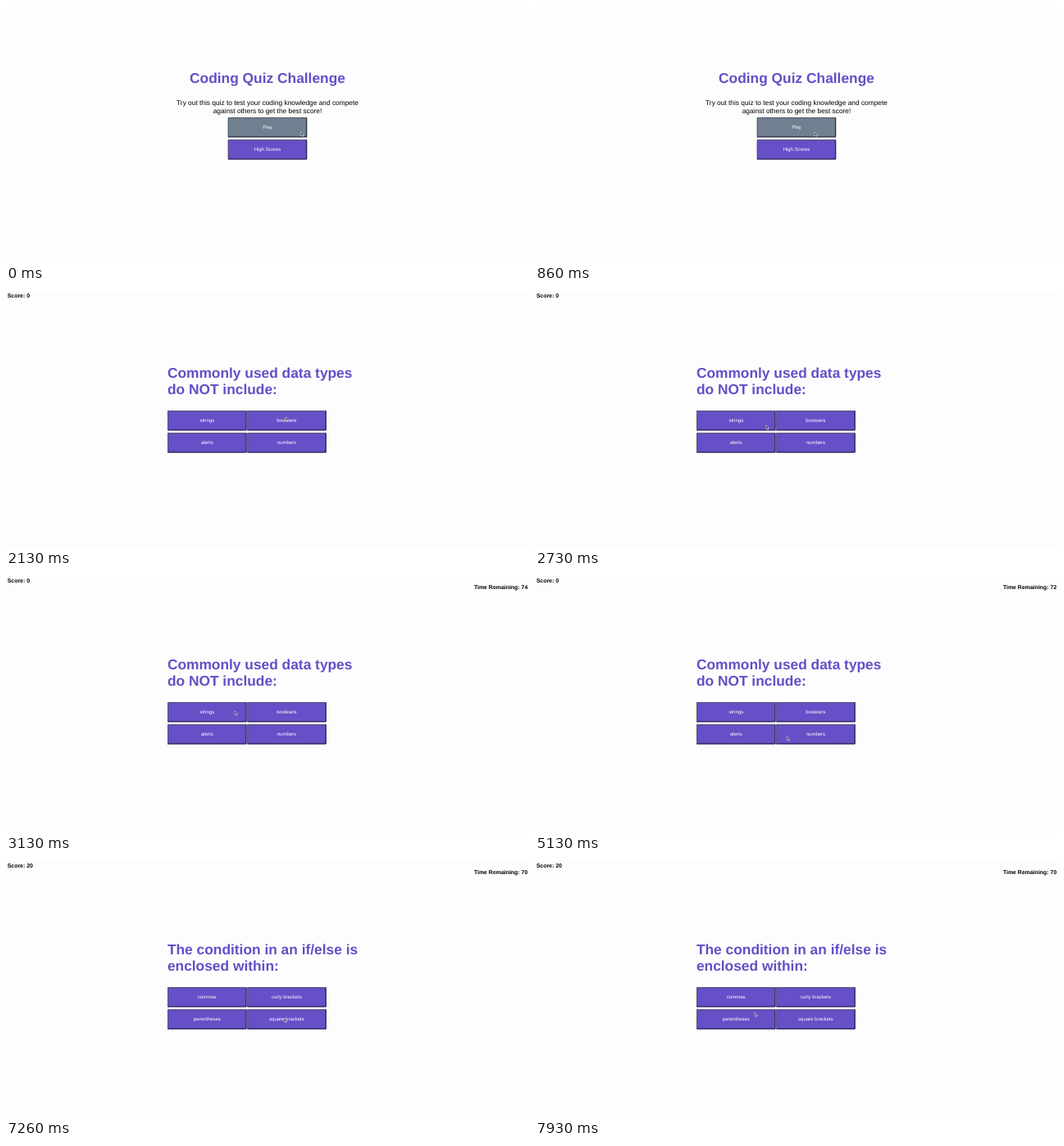
Animation, 638 px wide and 314 px high, one loop 8 s. Source, as an HTML page:

```html
<!DOCTYPE html>
<html lang="en">
<head>
<meta charset="utf-8">
<title>Coding Quiz Challenge</title>
<style>
  html, body { margin: 0; width: 100%; height: 100%; overflow: hidden; background: #fdfdfd; }
  svg { display: block; overflow: hidden; }
  text { font-family: "Liberation Sans", Arial, sans-serif; text-rendering: geometricPrecision; }
  .heading { font-size: 17.35px; font-weight: bold; fill: #654ec6; }
  .intro { font-size: 8.35px; text-anchor: middle; }
  .status { font-size: 6.95px; font-weight: bold; }
  .label text { font-size: 6px; fill: #fff; text-anchor: middle; }
  .button { color: #664fc7; }
  .hovered { color: #708090; }

  .scenes, .timer, .settle, .cursor { animation: 8s step-end infinite; }
  .scenes { animation-name: scenes; }
  .timer { animation-name: timer; }
  .settle { animation-name: settle; }
  .cursor { animation-name: cursor; }

  /* Screens are stacked one stage height apart. */
  @keyframes scenes {
    0% { transform: translateY(0); }
    26.625% { transform: translateY(-314px); }
    74.125% { transform: translateY(-628px); }
    90.75%, 100% { transform: translateY(-942px); }
  }
  @keyframes timer {
    0% { transform: translateY(20px); }
    39.125% { transform: translateY(0); }
    51.625% { transform: translateY(-20px); }
    64.125% { transform: translateY(-40px); }
    76.625% { transform: translateY(-60px); }
    89.125%, 100% { transform: translateY(-80px); }
  }
  /* The page drops once the timer takes up a line. */
  @keyframes settle {
    0% { transform: translateY(-8px); }
    39.125%, 100% { transform: translateY(0); }
  }
  @keyframes cursor {
    0% { transform: translate(360px, 153.8px); }
    3.25% { transform: translate(352px, 154px); }
    10.75% { transform: translate(341.2px, 154px); }
    34.125% { transform: translate(282px, 164px); }
    39.125% { transform: translate(279.3px, 165px); }
    49.125% { transform: translate(288px, 186px); }
    51.625% { transform: translate(279.5px, 189px); }
    58.25% { transform: translate(293.5px, 196px); }
    64.125% { transform: translate(307.2px, 195.8px); }
    73.25% { transform: translate(268px, 194.8px); }
    85% { transform: translate(339.5px, 192px); }
    99.125%, 100% { transform: translate(268px, 184.8px); }
  }
</style>
</head>
<body>
<svg width="100%" height="100%" viewBox="0 0 638 314">
  <defs>
    <g id="button">
      <rect width="96.4" height="24.2" fill="currentColor"/>
      <path d="M.4 24V.5H96" fill="none" stroke="#555064" stroke-width=".9"/>
      <path d="M.4 23.7H95.9V.4" fill="none" stroke="#1c1733"/>
    </g>
    <g id="choices" class="button">
      <use href="#button" x="197.1" y="154.2"/>
      <use href="#button" x="294.3" y="154.2"/>
      <use href="#button" x="197.1" y="181.3"/>
      <use href="#button" x="294.3" y="181.3"/>
    </g>
  </defs>

  <g class="scenes">
    <g>
      <text class="heading" x="319" y="93.5" text-anchor="middle">Coding Quiz Challenge</text>
      <text class="intro" x="319" y="121.3">Try out this quiz to test your coding knowledge and compete</text>
      <text class="intro" x="319" y="130.9">against others to get the best score!</text>
      <use class="hovered" href="#button" x="270.8" y="136.2"/>
      <use class="button" href="#button" x="270.8" y="163.3"/>
      <g class="label">
        <text x="319" y="150.1">Play</text>
        <text x="319" y="177.2">High Scores</text>
      </g>
    </g>

    <g transform="translate(0 314)">
      <text class="status" x="1.7" y="8">Score: 0</text>
      <g class="settle">
        <text class="heading" x="196.9" y="114.3">Commonly used data types</text>
        <text class="heading" x="196.9" y="134.4">do NOT include:</text>
        <use href="#choices"/>
        <g class="label">
          <text x="245.3" y="168.2">strings</text>
          <text x="342.4" y="168.2">booleans</text>
          <text x="245.3" y="195.3">alerts</text>
          <text x="342.4" y="195.3">numbers</text>
        </g>
      </g>
    </g>

    <g transform="translate(0 628)">
      <text class="status" x="1.7" y="8">Score: 10</text>
      <text class="heading" x="196.9" y="114.3">Arrays in Javascript can be</text>
      <text class="heading" x="196.9" y="134.4">used to store:</text>
      <use href="#choices"/>
      <g class="label">
        <text x="245.3" y="168.2">numbers and strings</text>
        <text x="342.4" y="168.2">other arrays</text>
        <text x="245.3" y="195.3">booleans</text>
        <text x="342.4" y="195.3">all of the above</text>
      </g>
    </g>

    <g transform="translate(0 942)">
      <text class="status" x="1.7" y="8">Score: 20</text>
      <text class="heading" x="196.9" y="114.3">The condition in an if/else is</text>
      <text class="heading" x="196.9" y="134.4">enclosed within:</text>
      <use href="#choices"/>
      <g class="label">
        <text x="245.3" y="168.2">commas</text>
        <text x="342.4" y="168.2">curly brackets</text>
        <text x="245.3" y="195.3">parentheses</text>
        <text x="342.4" y="195.3">square brackets</text>
      </g>
    </g>
  </g>

  <svg y="8" width="638" height="12">
    <g class="timer status" text-anchor="end">
      <text x="636.3" y="8.2">Time Remaining: 74</text>
      <text x="636.3" y="28.2">Time Remaining: 73</text>
      <text x="636.3" y="48.2">Time Remaining: 72</text>
      <text x="636.3" y="68.2">Time Remaining: 71</text>
      <text x="636.3" y="88.2">Time Remaining: 70</text>
    </g>
  </svg>

  <path class="cursor" d="M0 0V4.6L1 3.8 1.8 5.5 2.7 5.1 1.9 3.4H3.2Z"
        fill="#111" stroke="#fff" stroke-width=".6"/>
</svg>
</body>
</html>
```
